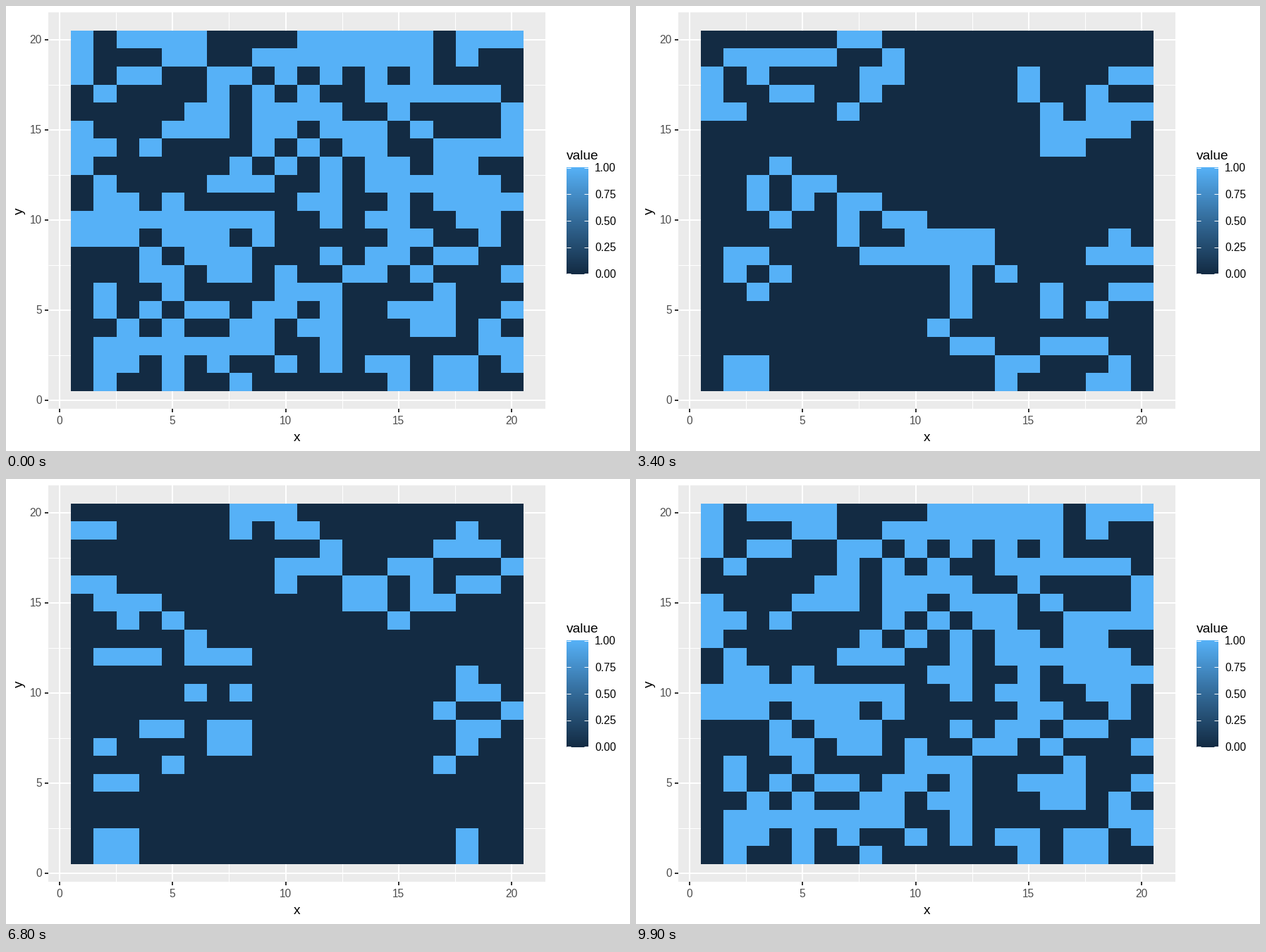
A matplotlib script that plays this animation: 885 by 632 pixels, repeating every 10000 ms.

```python
import numpy as np
import matplotlib.pyplot as plt
from matplotlib.animation import FuncAnimation
from matplotlib.colors import LinearSegmentedColormap
from matplotlib.patches import Rectangle

W, H, DPI = 885, 632, 100
PX = 72 / DPI  # points per pixel
N = 20
FRAMES, INTERVAL = 100, 100
LEFT, RIGHT, TOP, BOTTOM = 60, 765, 9, 572
BLUES = LinearSegmentedColormap.from_list(
    "blues", ["#132B43", "#336A98", "#56B1F7"], N=301)

# Starting population, top row (y = 20) first
SEED = """
#.####....######.###
#...##..########.#..
#.##..##.#.#.#.#....
.#....#.#.#..######.
.....##.####..#....#
#...###.##.###.#...#
##.#....#.#.##..####
#......#.#.#.##.##..
.#....###..#.######.
.##.#.....##..#.####
#########..#.##..##.
###.###.#.....##..#.
...#.###...#.##.##..
...##.##.#..##.#...#
.#..#....###....#...
.#.#.##.##.#..###..#
..#.#..##.##...##.#.
.########..#......##
.##.#.#..#.#.##.##.#
.#..#..#......#.##..
""".split()

# Frame at which each generation starts to fade into the next
FADES = [*range(3, 49, 5), *range(52, 83, 5), *range(86, 99, 4)]


def step(grid):
    """One Game of Life generation with dead cells beyond the border."""
    padded = np.pad(grid, 1)
    block = sum(padded[r:r + N, c:c + N] for r in range(3) for c in range(3))
    return ((block == 3) | ((block == 4) & (grid == 1))).astype(int)


def evolve(grid, count):
    history = [grid]
    for _ in range(count - 1):
        history.append(step(history[-1]))
    return history


def x_pos(v):
    return 76 + 32.06 * v


def y_pos(v):
    return 559.6 - 25.6 * v


generations = evolve(np.array([[int(c == "#") for c in row] for row in SEED]),
                     len(FADES))

fig = plt.figure(figsize=(W / DPI, H / DPI), dpi=DPI, facecolor="white")
plt.rcParams["font.family"] = "Liberation Sans"
ax = fig.add_axes([0, 0, 1, 1])
ax.axis("off")


def label(x, y, text, size=15.5, color="black", **kw):
    ax.text(x, y, text, fontsize=size * PX, color=color, va="baseline", **kw)


def line(xs, ys, width, color="white", z=2):
    ax.plot(xs, ys, color=color, lw=width * PX, zorder=z,
            solid_capstyle="butt", snap=True)


# Panel and grid
ax.add_patch(Rectangle((LEFT, TOP), RIGHT - LEFT, BOTTOM - TOP,
                       fc="#EBEBEB", ec="none", zorder=1))
for v in np.arange(2.5, 20, 5):
    line([x_pos(v)] * 2, [TOP, BOTTOM], 1)
    line([LEFT, RIGHT], [y_pos(v)] * 2, 1)
for v in range(0, 21, 5):
    x, y = x_pos(v), y_pos(v)
    line([x, x], [TOP, BOTTOM], 2)
    line([LEFT, RIGHT], [y, y], 2)
    line([x, x], [BOTTOM, BOTTOM + 5], 2, "#333333")
    line([LEFT - 5, LEFT], [y, y], 2, "#333333")
    label(x - 0.3, 593.5, str(v), color="#4D4D4D", ha="center")
    label(51, y + 5.6, str(v), color="#4D4D4D", ha="right")
label(412.5, 618.5, "x", 19.2, ha="center")
label(23.5, 291, "y", 19.2, ha="center", rotation=90, rotation_mode="anchor")

# Legend
label(794.5, 218, "value", 19.2, ha="left")
ax.imshow(np.linspace(1, 0, 300)[:, None], cmap=BLUES, vmin=0, vmax=1,
          extent=(795, 826, 381, 229), aspect="auto", zorder=2)
for v in np.linspace(0, 1, 5):
    y = 380.2 - 150.4 * v
    line([795, 801], [y, y], 1, z=3)
    line([820, 826], [y, y], 1, z=3)
    label(835, y + 5.6, f"{v:.2f}", ha="left")

# Cells, with edges on whole pixels
k = np.arange(N + 1)
cells = ax.pcolormesh(np.rint(92.4 + 32.07 * k), np.rint(34.88 + 25.6 * k),
                      generations[0], cmap=BLUES, vmin=0, vmax=1,
                      antialiased=False, linewidth=0, zorder=4)
ax.set_xlim(0, W)
ax.set_ylim(H, 0)


def update(frame):
    done = sum(f < frame for f in FADES)
    grid = generations[done % len(FADES)]
    if frame in FADES:
        grid = (grid + generations[(done + 1) % len(FADES)]) / 2
    cells.set_array(np.asarray(grid, float))
    return [cells]


anim = FuncAnimation(fig, update, frames=FRAMES, interval=INTERVAL,
                     repeat=True, repeat_delay=0, blit=False)
plt.show()
```
